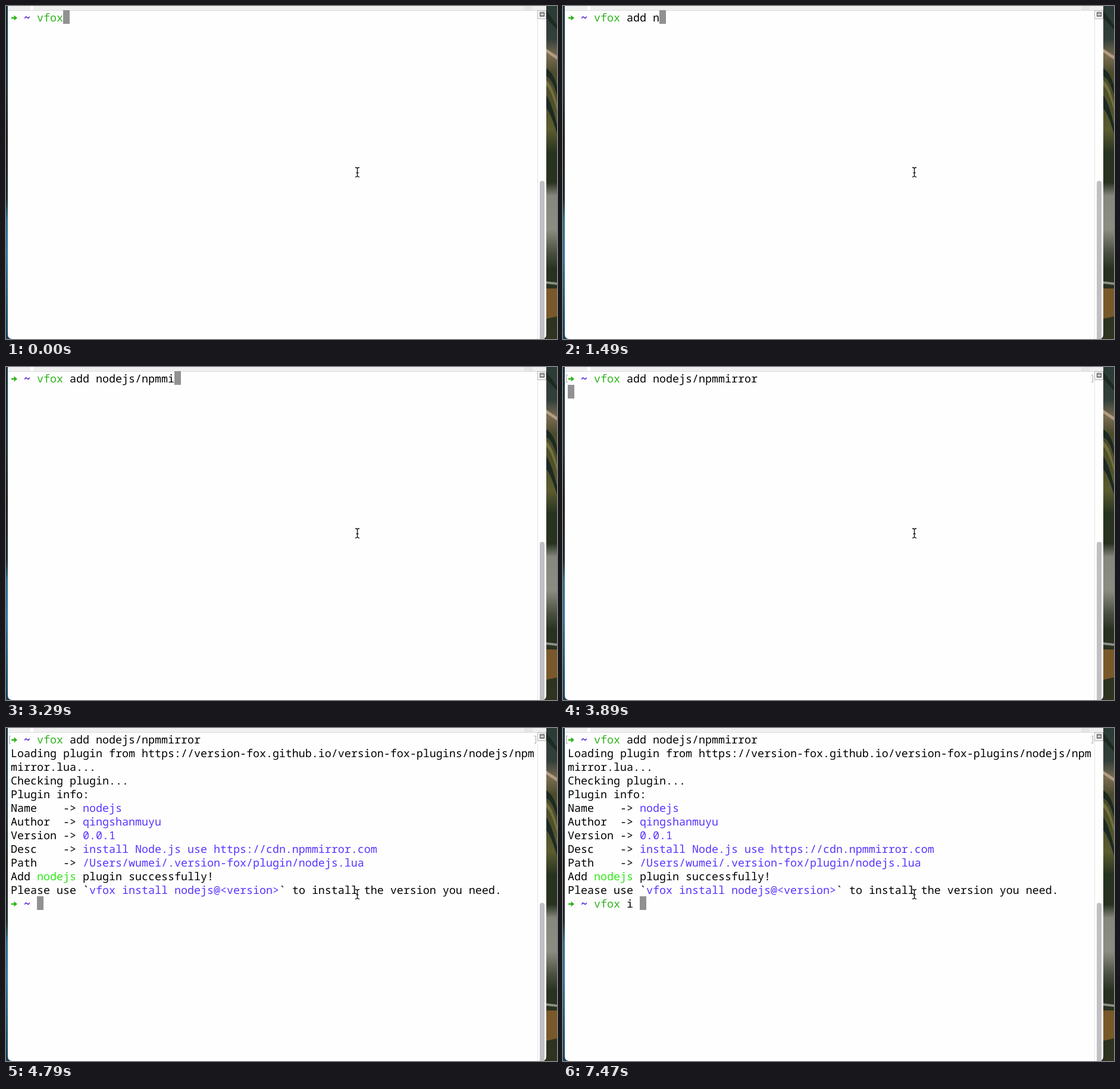
These frames come from a looping animation (926 by 560 pixels, 8 s). An HTML page:

```html
<!DOCTYPE html>
<html lang="en">
<head>
<meta charset="utf-8">
<title>Terminal</title>
<style>
html, body { margin: 0; width: 100%; height: 100%; overflow: hidden; background: #1a2018; }
svg { display: block; }
text { font: 18.333px "Noto Sans Mono", "DejaVu Sans Mono", monospace; white-space: pre; text-rendering: geometricPrecision; }
.cmd { fill: #2fb41d; }
.tip { fill: #5a33ff; }
.ok { fill: #2fe719; }
.dir { fill: #400bd9; font-weight: bold; }
</style>
</head>
<body>
<svg width="926" height="560" viewBox="0 0 926 560">
  <defs>
    <linearGradient id="hills" x2="0" y2="1">
      <stop offset="0" stop-color="#2a3a35"/>
      <stop offset=".1" stop-color="#33403a"/>
      <stop offset=".15" stop-color="#7a6c52"/>
      <stop offset=".2" stop-color="#4a4b2c"/>
      <stop offset=".3" stop-color="#4e5129"/>
      <stop offset=".37" stop-color="#5c5c30"/>
      <stop offset=".44" stop-color="#27331f"/>
      <stop offset=".53" stop-color="#28321f"/>
      <stop offset=".57" stop-color="#85877d"/>
      <stop offset=".67" stop-color="#8c8d82"/>
      <stop offset=".74" stop-color="#4a5041"/>
      <stop offset=".79" stop-color="#283120"/>
      <stop offset="1" stop-color="#2e3420"/>
    </linearGradient>
    <linearGradient id="lake" x2="0" y2="1">
      <stop offset="0" stop-color="#14323e"/>
      <stop offset=".25" stop-color="#1b343a"/>
      <stop offset=".4" stop-color="#1a1d18"/>
      <stop offset=".58" stop-color="#1c2a2c"/>
      <stop offset=".64" stop-color="#2c6d8c"/>
      <stop offset=".75" stop-color="#2f7698"/>
      <stop offset="1" stop-color="#173f57"/>
    </linearGradient>
  </defs>

  <rect width="12" height="560" fill="url(#lake)"/>
  <g transform="translate(896)">
    <rect width="30" height="560" fill="url(#hills)"/>
    <path d="M12 8L30 32V40L12 20zM12 105Q24 112 30 135V150Q22 122 12 118zM12 150Q22 165 30 200V215Q20 180 12 172z" fill="#1d2a22"/>
    <path d="M12 72L30 84V90L12 78z" fill="#b39c80"/>
    <path d="M12 125Q22 132 30 165V176Q20 140 12 134z" fill="#74703f"/>
    <path d="M12 463L30 465V469L12 467z" fill="#8d8e88"/>
    <path d="M12 475H30V522L12 526z" fill="#79592a"/>
  </g>

  <path d="M3 0H908V552Q908 560 900 560H11Q3 560 3 552z" fill="#fefefe"/>
  <path d="M3 0H908V7H3z" fill="#efefef"/>
  <path d="M871 0H885V7H871z" fill="#e5e5e5"/>
  <path d="M41 0H46V7H41z" fill="#fff"/>
  <path d="M3 7.5H908" stroke="#dcdcdc"/>
  <path d="M893.5 8V560" stroke="#e4e4e4"/>
  <path d="M893.5 7.5H907.5V21.5H893.5z" fill="#f6f6f6" stroke="#b4b4b4"/>
  <path d="M897.5 10.5H904.5V17.5H897.5z" fill="#fff" stroke="#444"/>
  <path d="M898 12.5H904M898 15.5H904" stroke="#444"/>
  <path d="M897 560V298a4 4 0 0 1 8 0V560z" fill="#c0c0c4"/>

  <path id="marks" d="M8 13.5H5.5V25.5H8M888 13.5H890.5V25.5H888" fill="none" stroke="#a8a8a8"/>
  <rect id="cursor" width="11" height="23" fill="#919191"/>
  <g id="screen"></g>
  <path d="M587 271.5Q590.5 271.5 590.5 274V285Q590.5 287.500 587 287.500M594 271.500Q590.500 271.500 590.500 274M590.500 285Q590.500 287.500 594 287.500M588.500 280.500H592.500" fill="none" stroke="#111" stroke-width="1.300"/>
</svg>
<script>
const CELL = 11, ROW = 23, LOOP = 8000;
const $ = id => document.getElementById(id);
const span = (cls, s) => `<tspan class="${cls}">${s}</tspan>`;
const info = (key, value) => key.padEnd(8) + "-&gt; " + span("tip", value);

const output = [
  "Loading plugin from https://version-fox.github.io/version-fox-plugins/nodejs/npm",
  "mirror.lua...",
  "Checking plugin...",
  "Plugin info:",
  info("Name", "nodejs"),
  info("Author", "qingshanmuyu"),
  info("Version", "0.0.1"),
  info("Desc", "install Node.js use https://cdn.npmmirror.com"),
  info("Path", "/Users/wumei/.version-fox/plugin/nodejs.lua"),
  `Add ${span("ok", "nodejs")} plugin successfully!`,
  `Please use \`${span("tip", "vfox install nodejs@&lt;version&gt;")}\` to install the version you need.`
];

// [time in ms, characters typed]
const first = "vfox add nodejs/npmmirror";
const firstKeys = [[0, 4], [300, 5], [440, 6], [590, 7], [890, 8], [1190, 7], [1340, 9], [1490, 10],
  [1640, 11], [1790, 13], [1940, 14], [2090, 16], [2390, 17], [2540, 18], [2690, 19],
  [3140, 20], [3290, 21], [3440, 22], [3590, 24], [3740, 25]];
const second = "vfox i ";
const secondKeys = [[0, 0], [5240, 1], [5390, 2], [5530, 4], [5680, 5], [7020, 6], [7470, 7]];
const ENTER = 3890, LOADING = 4490, DONE = 4790;

const typed = (keys, t) => keys.filter(k => k[0] <= t).pop()[1];

const line = (row, html) => `<text x="8" y="${26 + ROW * row}">${html}</text>`;

function prompt(row, text) {
  const y = 20 + ROW * row;
  return `<path class="cmd" d="M9 ${y - 1.2}H13.500V${y - 4.500}L19 ${y}L13.500 ${y + 4.500}V${y + 1.200}H9z"/>` +
    line(row, "  " + span("dir", "~") + " " + span("cmd", text.slice(0, 4)) + text.slice(4));
}

let shown = "";
function draw(t) {
  const n = typed(firstKeys, t), m = typed(secondKeys, t);
  const count = t < LOADING ? 0 : t < DONE ? 2 : output.length;
  let html = prompt(0, first.slice(0, n));
  html += output.slice(0, count).map((s, i) => line(i + 1, s)).join("");
  if (t >= DONE) html += prompt(12, second.slice(0, m));
  const row = t < ENTER ? 0 : count + 1;
  const col = t < ENTER ? 4 + n : t < DONE ? 0 : 4 + m;
  $("cursor").setAttribute("x", 8 + CELL * col);
  $("cursor").setAttribute("y", 7 + ROW * row);
  $("marks").style.display = t < ENTER ? "none" : "";
  if (html !== shown) $("screen").innerHTML = shown = html;
}

const start = performance.now();
function tick() {
  draw((performance.now() - start) % LOOP);
  requestAnimationFrame(tick);
}
tick();
</script>
</body>
</html>
```
